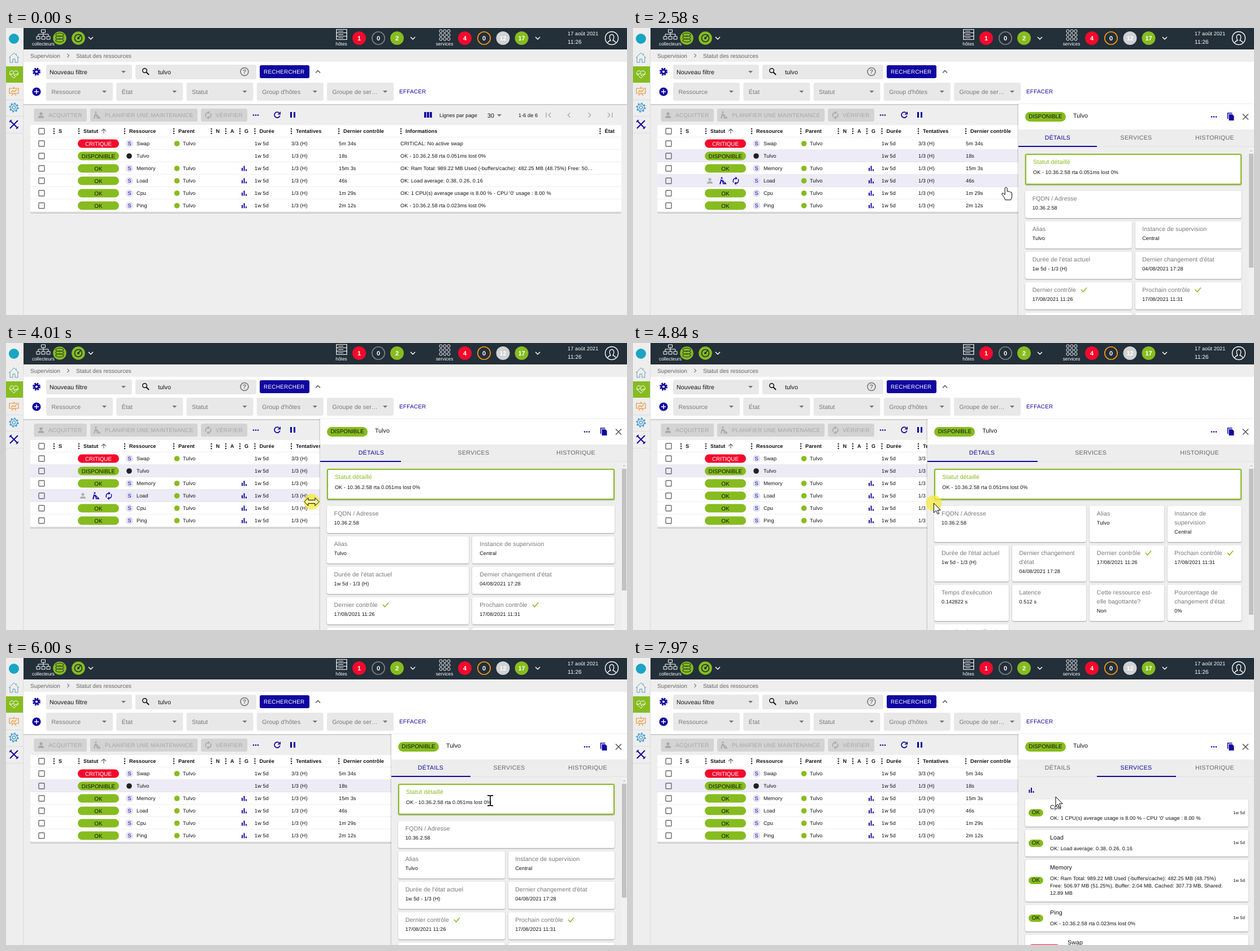
Write an HTML page that moves like this. It is 1099 by 509 pixels and loops after 8 s.

```html
<!DOCTYPE html>
<html lang="fr">
<head>
<meta charset="utf-8">
<title>Statut des ressources</title>
<style>
html,body{margin:0;width:100%;height:100%;overflow:hidden;background:#eee}
body{position:relative;font:9.13px/16px "Liberation Sans",Arial,sans-serif;letter-spacing:.0107em;color:#111;text-rendering:geometricPrecision}
svg{position:absolute;left:0;top:0;overflow:visible}
text{fill:#111}
.b{font-weight:700}
.m{font-size:10.65px;letter-spacing:.0094em}
.g{fill:#777}
.crumb{font-size:10.13px;letter-spacing:0;fill:#666}
.btn{font-size:9.9px;letter-spacing:.0286em}
.off{fill:#a6a6a6}
.w{fill:#fff}
.navy{fill:#10069f}
.tiny{font-size:8.4px;letter-spacing:0;fill:#fff}
.mid{text-anchor:middle}
.ct{font-size:9.9px;letter-spacing:0;text-anchor:middle}
.num{font-size:11px;font-weight:700;letter-spacing:0;text-anchor:middle;fill:#fff}
.i{fill:currentColor}
.s{fill:none;stroke:currentColor;stroke-width:1.5}
.bg{fill:#fff}
.sel .bg,.on .bg{fill:#ecebf6}
.acts,.more{display:none}
.on .acts,.tight .more{display:inline}
.on .chip{display:none}
.tight .cw{width:67px}
.tight .ct{transform:translateX(-3px)}
.tight .col{transform:translateX(-5.7px)}
#panel{position:absolute;top:135px;right:0;bottom:0;background:#eee;overflow:hidden;box-shadow:-1px 0 2px #0003}
.head{position:absolute;left:0;right:0;top:0;height:45px;background:#fff}
.pill{position:absolute;border-radius:9px;background:#86bc1f;font-size:9.9px;letter-spacing:0;text-align:center}
.name{position:absolute;left:97px;top:13.3px;font-size:10.65px}
.head svg{left:auto;right:0;width:100px;height:45px}
.tabs{position:absolute;left:0;right:0;top:45px;height:31px;display:flex;background:#ededed;border-bottom:1px solid #e2e2e2;box-sizing:border-box;font-size:10.6px;letter-spacing:.0286em;line-height:31px;text-align:center;color:#666}
.tabs span{flex:1}
.tabs .cur{color:#10069f}
#bar{position:absolute;top:29px;height:2px;background:#10069f}
.page{position:absolute;left:0;right:0;top:77px;bottom:0}
.card{position:relative;box-sizing:border-box;background:#fff;border-radius:3px;box-shadow:0 1px 2px #0005}
.grid{position:absolute;left:12px;right:22px;top:77px;display:grid;gap:6px}
.grid .card{padding:6.3px 8px 9.7px 12.7px}
.card b{display:block;font-weight:400;font-size:10.65px;letter-spacing:.0094em;color:#777}
.wide{grid-column:span 2}
.state{position:absolute;left:12px;right:22px;top:11px;height:55px;border:2px solid #86bc1f;padding:5.3px 12px}
.state b{color:#86bc1f;margin-bottom:2px}
.ck{position:static;display:inline-block;width:12px;height:9px;margin-left:8px;vertical-align:-1px}
.track{position:absolute;right:0;top:0;width:10px;bottom:0;background:#f1f1f1}
#thumb{position:absolute;left:1px;top:11px;width:8px;background:#c1c1c1}
.svc{margin:0 10px 6px 12px;padding:6px 0 7.5px 44px;line-height:13px}
.svc b{color:#111;line-height:16px;margin-bottom:5px}
.svc .pill{left:6px;top:50%;width:26px;height:13px;margin-top:-6.5px}
.svc small{position:absolute;right:6px;top:50%;margin-top:-7px;font-size:7.6px}
#ripple{position:absolute;top:0;bottom:0;left:33.33%;width:33.34%;background:#10069f}
</style>
</head>
<body>
<svg id="app" width="1099" height="509"></svg>
<div id="panel"></div>
<svg id="over" width="1099" height="509"></svg>
<script>
const NAVY = '#10069f', GREEN = '#86bc1f', RED = '#f4092c', DARK = '#232f39';
const HOST = 'Tulvo', IP = '10.36.2.58';
const $ = id => document.getElementById(id);

const txt = (x, y, s, c = '') => `<text x="${x}" y="${y}" class="${c}">${s}</text>`;
const box = (x, y, w, h, fill, r = 0, c = 'r') => `<rect class="${c}" x="${x}" y="${y}" width="${w}" height="${h}" rx="${r}" fill="${fill}"/>`;
const dot = (x, y, r, fill, stroke = 'none') => `<circle cx="${x}" cy="${y}" r="${r}" fill="${fill}" stroke="${stroke}" stroke-width="1.6"/>`;
const fillP = d => `<path class="i" d="${d}"/>`;
const line = (d, w = 1.5) => `<path class="s" style="stroke-width:${w}" d="${d}"/>`;
const ring = (r, w, dash = '') => `<circle class="s" r="${r}" style="stroke-width:${w}" stroke-dasharray="${dash}"/>`;

const icons = {
  person: fillP('M-2.6-2.5a2.6 2.6 0 1 1 5.2 0a2.6 2.6 0 1 1-5.2 0M-5 5V3.5Q-5 1 0 1T5 3.5V5z'),
  worker: dot(-2, -5, 1.5, 'currentColor') + line('M-4-2L0 1L1 6M-3-1L-5 6', 2) + line('M-1-2L4 4', 1.1) + fillP('M1.5 6l2.5-4 2.5 4z'),
  sync: line('M-4 3A4.8 4.8 0 0 1 0-4.5M4-3A4.8 4.8 0 0 1 0 4.5') + fillP('M-.5-7.5v6l3.2-3zM.5 7.5v-6l-3.2 3z'),
  refresh: line('M3.5-3.5A5 5 0 1 0 4.8 1.5', 1.7) + fillP('M6-6v5.5H.5z'),
  gear: ring(3.6, 3) + ring(5.9, 2.2, '2.9 1.734'),
  cog: ring(2.8, 1.2) + ring(6, 1.2) + ring(7.6, 2, '2.6 3.369'),
  bars: fillP('M-4.5-1h2v5.5h-2zM-1-4.5h2v9h-2zM2.5 1.5h2v3h-2z'),
  dots: [-4, 0, 4].map(x => dot(x, 0, 1.3, 'currentColor')).join(''),
  kebab: [-4, 0, 4].map(y => dot(0, y, 1.3, 'currentColor')).join(''),
  tri: fillP('M-4-2h8l-4 4z'),
  down: line('M-4-2L0 2L4-2'),
  up: line('M-4 2L0-2L4 2'),
  right: line('M-2-4L2 0L-2 4', 1.3),
  left: line('M2-4L-2 0L2 4', 1.3),
  first: line('M4-4L0 0L4 4M-4-4.5V4.5', 1.3),
  last: line('M-4-4L0 0L-4 4M4-4.5V4.5', 1.3),
  check: `<rect class="s" x="-5" y="-5" width="10" height="10" rx="1" style="stroke-width:1.4"/>`,
  search: `<circle class="s" cx="-1.5" cy="-1.5" r="3.8"/>` + line('M1.5 1.5L6 6', 2),
  copy: line('M-5 4V-6H3') + fillP('M-3-4H3L6-1V7H-3z'),
  close: line('M-5-5L5 5M5-5L-5 5'),
  home: line('M-9 0L0-9L9 0M-7-2V8H-2V2H2V8H7V-2M4-8V-5', 1),
  pulse: line('M0 7L-7 0Q-9-4-5-6Q-2-7 0-4Q2-7 5-6Q9-4 7 0zM-8 0H-3L-1-3L1 3L3 0H8', 1),
  board: line('M-8-5H8V4H-8zM0-8V-5M-4 8L-1 4M4 8L1 4M-5 2L-2-1L1 1L5-3', 1.1),
  tools: line('M-7-7L7 7M7-7L-7 7', 2) + line('M-8-4L-4-8M4 8L8 4', 1.6),
  tree: line('M-3.5-8H3.5V-3H-3.5zM0-3V4M-9 4V0H9V4M-12 4h6v5h-6zM-3 4h6v5h-6zM6 4h6v5h-6z', 1),
  server: [-9, -3, 3].map(y => line(`M-9 ${y}H9V${y + 6}H-9zM-6 ${y + 3}H3`, 1.2)).join(''),
  user: ring(11.5, 1.4) + line('M-7 8Q-6 5-2 4Q-5-1-3-5Q0-8 3-5Q5-1 2 4Q6 5 7 8', 1.3)
};
const ico = (n, x, y, color = NAVY, k = 1) => `<g transform="translate(${x} ${y}) scale(${k})" color="${color}">${icons[n]}</g>`;

const badge = (x, n, fill, stroke) => dot(x, 18, stroke ? 11.2 : 12, fill, stroke) + txt(x, 22, n, 'num');
const select = (x, y, w, h, s, c = 'm g') =>
  box(x, y, w, h, '#e8e8e8', 3) + txt(x + (c == 'm' ? 6 : 9.5), y + h / 2 + 4, s, c) + ico('tri', x + w - 15, y + h / 2, '#757575');
const button = (x, w, s, icon, tx, ix) => box(x, 143, w, 23, '#d3d3d3', 3) + ico(icon, ix, 154.5, '#a6a6a6') + txt(tx, 158, s, 'btn off');

function topBar() {
  let o = box(31, 0, 1068, 38, DARK) + dot(14, 19, 9, '#19a5c4');
  o += ico('tree', 66, 11, '#fff') + txt(66, 31, 'collecteurs', 'tiny mid');
  o += dot(95, 18, 11.8, GREEN) + `<g color="${DARK}">` + [13, 18, 23].map(y => line(`M88 ${y}q7 4 14 0M88 ${y}v-2q7-4 14 0v2`, 1)).join('') + '</g>';
  o += dot(128, 18, 11.8, GREEN) + dot(128, 18, 6.5, 'none', DARK) + dot(128, 18, 2, DARK) + `<g color="${DARK}">${line('M128 18L133 12')}</g>`;
  o += ico('down', 150, 18, '#fff') + ico('server', 594, 11.5, '#fff') + txt(593.5, 31, 'hôtes', 'tiny mid');
  o += badge(625, 1, RED) + badge(659, 0, 'none', '#818285') + badge(692, 2, GREEN) + ico('down', 720, 18, '#fff');
  for (let k = 0; k < 9; k++) o += `<circle cx="${769.5 + k % 3 * 7}" cy="${5.5 + (k / 3 | 0) * 7}" r="2.6" fill="none" stroke="#fff"/>`;
  o += txt(776, 31, 'services', 'tiny mid') + badge(812, 4, RED) + badge(846, 0, 'none', '#ff9a13') + badge(879.5, 12, '#d1d2d4') + badge(912.5, 17, GREEN);
  o += ico('down', 941, 18, '#fff') + txt(994, 13, '17 août 2021', 'w') + `<g style="font-size:10px">${txt(994, 28, '11:26', 'w')}</g>` + ico('user', 1072, 18, '#fff');
  return o;
}

function sideBar() {
  let o = box(30, 38, 1, 471, '#dcdcdc') + box(0, 68, 30, 29, GREEN);
  for (const y of [127, 156, 186]) o += box(0, y, 30, 1, '#dcdcdc');
  return o + ico('home', 14, 53, '#5b9db5') + ico('pulse', 14, 82, '#fff') + ico('board', 14, 112, '#f08a24') + ico('cog', 14, 141, '#2f93cf') + ico('tools', 14, 171);
}

function filters() {
  let o = txt(43, 53, 'Supervision', 'crumb') + ico('right', 110, 49, '#666', .8) + txt(124, 53, 'Statut des ressources', 'crumb');
  o += box(31, 134, 1068, 2.5, '#c4c4c4') + box(31, 60, 1068, 75, '#fff');
  o += ico('gear', 54, 77.5) + select(71, 65, 152, 26, 'Nouveau filtre', 'm');
  o += box(229, 65, 214, 26, '#e8e8e8', 3) + ico('search', 247, 77, '#111') + txt(269, 81.5, HOST.toLowerCase(), 'm');
  o += dot(422, 77.5, 7, 'none', '#757575') + txt(422, 81.3, '?', 'm g mid b');
  o += box(449, 66, 88, 23, NAVY, 3) + txt(456, 81, 'RECHERCHER', 'btn w') + ico('up', 552, 77.5, '#555');
  o += dot(54, 113, 7.6, NAVY) + `<g color="#fff">${line('M50 113H58M54 109V117')}</g>`;
  ['Ressource', 'État', 'Statut', "Group d'hôtes", 'Groupe de ser…'].forEach((s, k) => o += select(71 + k * 124.25, 97, 118, 32, s));
  return o + txt(696, 116, 'EFFACER', 'btn navy');
}

function toolBar() {
  let o = button(49.5, 93.5, 'ACQUITTER', 'person', 75, 62) + button(149, 190, 'PLANIFIER UNE MAINTENANCE', 'worker', 175, 161) + button(345, 82, 'VÉRIFIER', 'sync', 371, 358);
  o += ico('dots', 442, 154.5) + ico('refresh', 480, 154) + box(503, 149, 3, 10, NAVY) + box(509, 149, 3, 10, NAVY);
  for (const x of [740, 745, 750]) o += box(x, 149, 3.8, 10, NAVY);
  o += txt(767, 158, 'Lignes par page') + txt(852, 158.5, '30', 'm') + ico('tri', 873, 155, '#757575') + txt(907, 158, '1-6 de 6');
  return o + ['first', 'left', 'right', 'last'].map((n, k) => ico(n, 960 + k * 36.3, 154.5, '#a6a6a6')).join('');
}

const rows = [
  ['CRITIQUE', 'Swap', '5m 34s', 'CRITICAL: No active swap'],
  ['DISPONIBLE', HOST, '18s', `OK - ${IP} rta 0.051ms lost 0%`],
  ['OK', 'Memory', '15m 3s', 'OK: Ram Total: 989.22 MB Used (-buffers/cache): 482.25 MB (48.75%) Free: 50<tspan class="more">6</tspan>…'],
  ['OK', 'Load', '46s', 'OK: Load average: 0.38, 0.26, 0.16'],
  ['OK', 'Cpu', '1m 29s', "OK: 1 CPU(s) average usage is 8.00 % - CPU '0' usage : 8.00 %"],
  ['OK', 'Ping', '2m 12s', 'OK - ' + IP + ' rta 0.023ms lost 0%']
];

function row([state, name, last, info], k) {
  const y = 205 + k * 22, b = y + 3.3, host = k == 1;
  let o = `<g class="row">` + box(43, y - 11, 1046, 22, '', 0, 'bg') + box(43, y + 10.5, 1046, 1, '#dedede') + ico('check', 63, y, '#6b6b6b');
  o += `<g class="chip">${box(127, y - 7.5, 73, 15, k ? GREEN : RED, 7.5, 'cw')}${txt(163.5, y + 3.5, state, k ? 'ct' : 'ct w')}</g>`;
  o += `<g class="acts">${ico('person', 136, y, '#b0b0b0')}${ico('worker', 159, y)}${ico('sync', 182, y)}</g><g class="col">`;
  o += host ? dot(218, y, 4.8, '#222') : dot(218.5, y, 6.8, '#e3e2f3') + txt(218.5, b, 'S', 'mid navy');
  o += txt(231, b, name);
  if (!host) o += dot(302.5, y, 4.8, GREEN) + txt(313, b, HOST);
  if (k > 1) o += ico('bars', 421.5, y);
  return o + txt(440, b, '1w 5d') + txt(505, b, (k ? 1 : 3) + '/3 (H)') + txt(589, b, last) + txt(698, b, info) + '</g></g>';
}

function table() {
  const head = (x, s) => ico('kebab', x, 183, '#333') + txt(x + 8, 186.3, s, 'b');
  let o = box(43, 173, 1046, 156, '#c9c9c9', 2) + box(43, 172, 1046, 155, '#fff', 2) + box(43, 193.5, 1046, 1, '#dedede');
  o += ico('check', 63, 183, '#6b6b6b') + head(85, 'S') + head(129, 'Statut') + `<g color="#666">${line('M173 187V179M169 183L173 179L177 183', 1.2)}</g><g class="col">`;
  [[210, 'Ressource'], [297, 'Parent'], [363.5, 'N'], [389, 'A'], [414, 'G'], [440.5, 'Durée'], [505, 'Tentatives'], [589, 'Dernier contrôle'], [699, 'Informations']]
    .forEach(h => o += head(...h));
  return o + '</g>' + head(1051.5, 'État') + rows.map(row).join('');
}

$('app').innerHTML = topBar() + sideBar() + filters() + toolBar() + table();

const tick = `<svg class="ck" style="color:${GREEN}"><path class="s" d="M1 4L4.500 8L11 .5"/></svg>`;
const card = ([title, value, c = '']) => `<div class="card ${c}"><b>${title}</b>${value}</div>`;
const svc = (name, info, c = '') => `<div class="card svc"><i class="pill" style="font-style:normal">OK</i><b>${name}</b>${info}<small>1w 5d</small></div>`;

$('panel').innerHTML = `
<div class="head"><div class="pill" style="left:12px;top:14px;width:72px;height:17px;line-height:17px">DISPONIBLE</div><div class="name">${HOST}</div>
<svg>${ico('dots', 29, 22.5)}${ico('copy', 58.5, 22)}${ico('close', 85, 22.5, '#555')}</svg></div>
<div class="tabs"><span>DÉTAILS</span><span>SERVICES</span><span>HISTORIQUE</span><i id="ripple"></i><i id="bar"></i></div>
<div class="page" id="details">${card(['Statut détaillé', rows[1][3], 'state'])}
<div class="grid" id="grid">${[
  ['FQDN / Adresse', IP, 'wide'], ['Alias', HOST], ['Instance de supervision', 'Central'],
  ["Durée de l'état actuel", '1w 5d - 1/3 (H)'], ["Dernier changement d'état", '04/08/2021 17:28'],
  ['Dernier contrôle' + tick, '17/08/2021 11:26'], ['Prochain contrôle' + tick, '17/08/2021 11:31'],
  ["Temps d'exécution", '0.142822 s'], ['Latence', '0.512 s'], ['Cette ressource est-elle bagottante?', 'Non'],
  ["Pourcentage de changement d'état", '0%'], ['Numéro de notification actuel', '0']].map(card).join('')}</div>
<div class="track"><svg width="10" height="10">${ico('up', 5, 6, '#888', .5)}</svg><i id="thumb"></i></div></div>
<div class="page" id="services" style="padding-top:39px;bottom:auto"><svg>${ico('bars', 23, 22.5)}</svg>
${svc('Cpu', rows[4][3])}${svc('Load', rows[3][3])}
${svc('Memory', 'OK: Ram Total: 989.22 MB Used (-buffers/cache): 482.25 MB (48.75%)<br>Free: 506.97 MB (51.25%), Buffer: 2.04 MB, Cached: 307.73 MB, Shared:<br>12.89 MB')}
${svc('Ping', rows[5][3])}
<div class="card svc" style="padding-left:75px;height:48px"><i class="pill" style="width:56px;background:${RED};top:23px"></i><b>Swap</b></div></div>`;

const shapes = {
  arrow: ['M0 0V17L4 13.200L6.800 19.500L9.300 18.400L6.600 12.300H12Z', 1],
  hand: ['M-2 2Q0-1 2 2V8Q4 6.500 5 8.500Q7 7.500 8 9.500Q10.500 9 10.500 12V17Q10 20 8.500 23H-1.500Q-2 20-7 13.500Q-8 10.500-5 11L-2 14Z', 1],
  resize: ['M-13 0L-6-7V-3H6V-7L13 0L6 7V3H-6V7Z', .35],
  text: ['M-5-9H-2Q0-9 0-7Q0-9 2-9H5M0-7V7M-5 9H-2Q0 9 0 7Q0 9 2 9H5', 0]
};
$('over').innerHTML = `<g id="cursor"><circle id="press" r="14" fill="#f6ea3c" fill-opacity=".75"/><path id="shape" fill="#fff" stroke="#000"/></g>`;

// Motion tracks: [ms, value, ...]
const mouse = [[130, 330, 443], [500, 276, 300], [880, 254, 236], [950, 251, 232], [1100, 251, 232], [1280, 241, 227], [1860, 241, 227],
  [1960, 275, 237], [2220, 460, 268], [2480, 640, 281], [2580, 660, 281.8], [2650, 671, 285], [2720, 682.5, 293], [3470, 682.5, 293],
  [3600, 668, 281.6], [3770, 620, 281.6], [4010, 541, 281.6], [4300, 516.5, 281.8], [4700, 516.5, 281.8], [4840, 532, 284], [5100, 624, 290],
  [5530, 707, 297], [5740, 707, 297], [6000, 857, 253], [6260, 884, 215], [6540, 890, 197], [7550, 890, 197], [7690, 868, 203], [7830, 800, 230], [7970, 748, 246]];
const edge = [[3500, 682], [3770, 634], [4010, 556], [4300, 516], [4740, 516], [4840, 521], [5100, 608], [5420, 682]];
const barWidth = [[3500, 139], [4010, 143], [4300, 154], [4570, 194], [4840, 195], [5530, 142], [5600, 139.5]];

function at(track, t, i = 1) {
  const n = track.findIndex(k => k[0] > t);
  if (n == 0) return track[0][i];
  if (n < 0) return track[track.length - 1][i];
  const a = track[n - 1], b = track[n];
  return a[i] + (b[i] - a[i]) * (t - a[0]) / (b[0] - a[0]);
}
const within = (t, a, b) => t >= a && t < b;
const ramp = (t, a, b) => Math.min(1, Math.max(0, (t - a) / (b - a)));
const ease = p => p * p * (3 - 2 * p);

const rowEls = [...document.querySelectorAll('.row')], tabs = document.querySelectorAll('.tabs span');
const start = performance.now();

function draw() {
  const t = (performance.now() - start) % 8000;
  const x = at(mouse, t), y = at(mouse, t, 2), p = at(edge, t);
  const open = t >= 1820, slide = (1 - ease(ramp(t, 1820, 1970))) * (1099 - p), left = open ? p + slide : 1099;
  const onServices = t >= 7010;

  const hover = t >= 130 && x < left && y >= 194 && y < 326 ? Math.floor((y - 194) / 22) : -1;
  rowEls.forEach((r, k) => {
    r.classList.toggle('on', k == hover);
    r.classList.toggle('sel', open && k == 1);
  });
  $('app').classList.toggle('tight', hover == 1);

  const s = $('panel').style, wide = p < 545;
  s.display = open ? 'block' : 'none';
  s.width = 1099 - p + 'px';
  s.transform = `translateX(${slide}px)`;
  $('grid').style.gridTemplateColumns = `repeat(${wide ? 4 : 2},minmax(0,1fr))`;
  $('thumb').style.height = (wide ? 259 : 202 + (682 - p) * .11) + 'px';
  $('bar').style.left = 139 * ease(ramp(t, 7010, 7310)) + 'px';
  $('bar').style.width = at(barWidth, t) + 'px';
  $('ripple').style.opacity = within(t, 6940, 7500) ? .12 * (1 - ramp(t, 7010, 7500)) : 0;
  tabs[0].className = onServices ? '' : 'cur';
  tabs[1].className = onServices ? 'cur' : '';
  $('details').style.display = onServices ? 'none' : 'block';
  $('services').style.display = onServices ? 'block' : 'none';

  const drag = within(t, 3060, 5460);
  let kind = 'arrow';
  if (open && (drag ? x - left < 3 : Math.abs(x - left) < 3)) kind = 'resize';
  else if (hover >= 0 || x > left && y > 180 && y < 211) kind = 'hand';
  else if (!onServices && !drag && x > left + 26 && y > 231 && y < 266) kind = 'text';
  const [d, fill] = shapes[kind];
  $('shape').setAttribute('d', d);
  $('shape').setAttribute('fill-opacity', fill);
  $('shape').setAttribute('stroke-width', kind == 'text' ? 1.6 : 1);
  $('press').style.display = drag || within(t, 1680, 1820) || within(t, 6940, 7080) ? 'inline' : 'none';
  $('cursor').style.display = t >= 130 ? 'inline' : 'none';
  $('cursor').setAttribute('transform', `translate(${x} ${y})`);
  requestAnimationFrame(draw);
}
draw();
</script>
</body>
</html>
```
